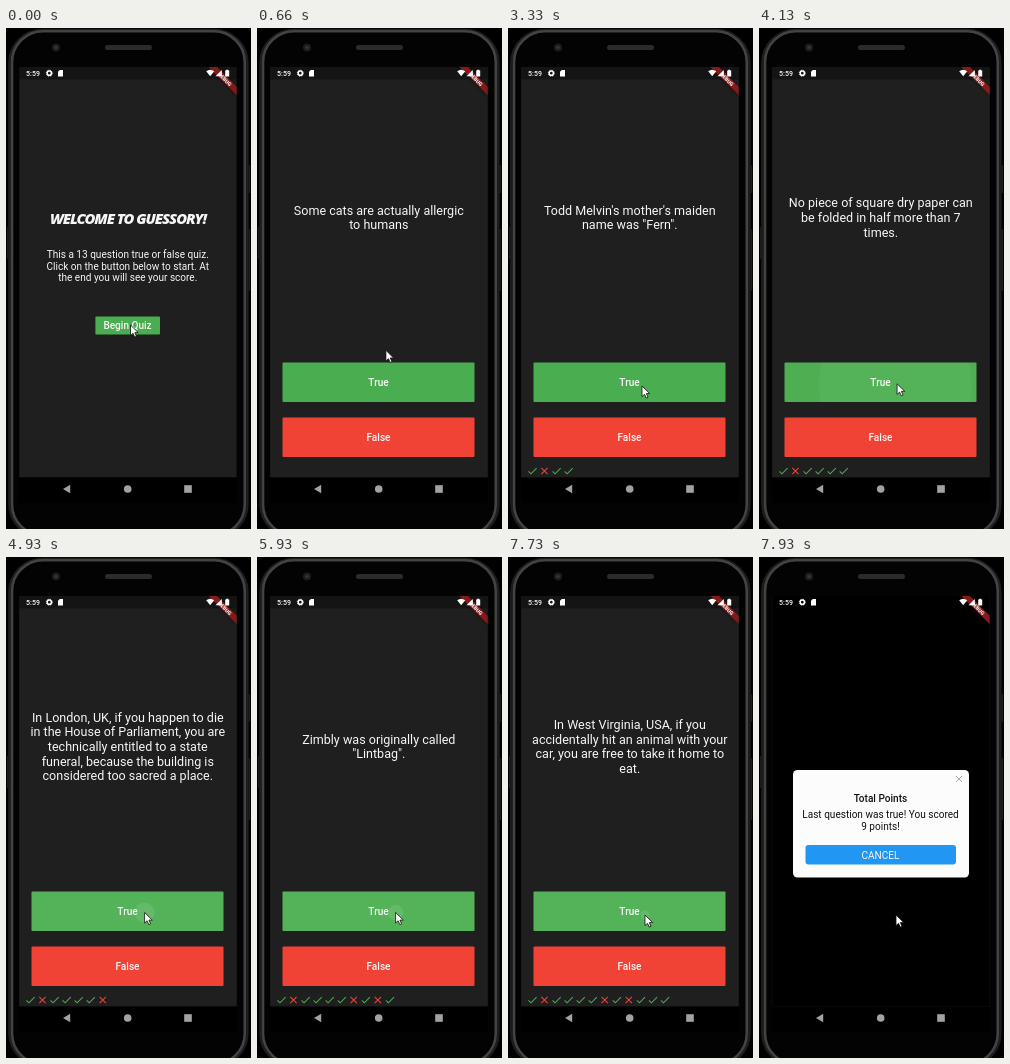
Animation, 245 px wide and 501 px high, one loop 8 s. Source, as an HTML page:

```html
<!DOCTYPE html>
<html lang="en">
<head>
<meta charset="utf-8">
<title>Quiz app</title>
<style>
  html, body { margin: 0; height: 100%; overflow: hidden; background: #000; }
  svg { display: block; width: 245px; height: 501px; }
  text { font: 10.05px Roboto, sans-serif; fill: #f6f6f6; text-anchor: middle; }
  .label { font-weight: 500; }
  .question { font-size: 12.55px; }
  .title { font: italic 800 condensed 18px "Open Sans", "Noto Sans", sans-serif; letter-spacing: -.07em; }
  .dark { fill: #111; }
  .page { fill: #1f1f1f; }
  .green { fill: #4aad4f; }
  .red { fill: #f14335; }
  .marks path { fill: none; stroke-width: 2; }
  .banner { filter: drop-shadow(0 0 1.5px #0009); }
</style>
</head>
<body>
<svg viewBox="0 0 245 501">
  <defs>
    <clipPath id="app"><rect x="13.3" y="39" width="217.3" height="410.2"/></clipPath>
    <clipPath id="beginClip"><rect x="89.4" y="288.5" width="64.6" height="18"/></clipPath>
    <clipPath id="trueClip"><rect x="25.5" y="334.5" width="192" height="39.5"/></clipPath>
  </defs>

  <!-- Phone body -->
  <path d="M1.8 199v32M243.4 137v28M243.4 201v62" stroke="#1e1e1e" stroke-width="1.5"/>
  <rect x="3.4" y="2" width="238" height="507" rx="33" fill="#030303" stroke="#1d1d1d" stroke-width="2.5"/>
  <rect x="6" y="3.2" width="232.8" height="504" rx="31" fill="none" stroke="#434343" stroke-width="2.6"/>
  <circle cx="50" cy="19.5" r="4" fill="#1c1d22"/>
  <circle cx="50" cy="19.5" r="1.8" fill="#34363e"/>
  <rect x="99" y="17" width="47" height="5" rx="2.5" fill="#2b2b2b"/>
  <rect x="13.3" y="39" width="217.3" height="436" fill="#000"/>

  <g clip-path="url(#app)">
    <rect class="page" x="13" y="39" width="218" height="411"/>
    <g id="welcome">
      <text id="title" class="title" x="122" y="195.7">WELCOME TO GUESSORY!</text>
      <text x="121.8" y="230.2">This a 13 question true or false quiz.</text>
      <text x="121.8" y="241.8">Click on the button below to start. At</text>
      <text x="121.8" y="253.4">the end you will see your score.</text>
      <rect class="green" x="89.4" y="288.5" width="64.6" height="18" rx="1"/>
      <g id="beginInk" clip-path="url(#beginClip)" fill="#fff">
        <rect x="89" y="288" width="65" height="19"/><circle/>
      </g>
      <text class="label" x="121.5" y="301">Begin Quiz</text>
    </g>
    <g id="quiz">
      <rect class="page" x="13" y="39" width="218" height="411"/>
      <g id="question"></g>
      <rect class="green" x="25.5" y="334.5" width="192" height="39.5" rx="1"/>
      <g id="trueInk" clip-path="url(#trueClip)" fill="#fff">
        <rect x="25" y="334" width="193" height="41"/><circle/>
      </g>
      <text class="label" x="121.5" y="358">True</text>
      <rect class="red" x="25.5" y="389.5" width="192" height="39.5" rx="1"/>
      <text class="label" x="121.5" y="413">False</text>
      <g id="marks" class="marks"></g>
    </g>
    <rect x="13" y="39" width="218" height="12.5" opacity=".35"/>
    <rect id="barrier" x="13" y="39" width="218" height="411"/>
    <g id="dialog">
      <rect x="34" y="213" width="176" height="107.5" rx="4.5" fill="#fcfcfc"/>
      <path d="M197 219l6 6m0-6l-6 6" stroke="#aaa"/>
      <text class="dark label" x="121.5" y="244.5">Total Points</text>
      <text class="dark" x="121.5" y="261">Last question was true! You scored</text>
      <text class="dark" x="121.5" y="272.5">9 points!</text>
      <rect x="46.5" y="288" width="150.5" height="19.5" rx="3" fill="#2196f3"/>
      <text x="121.5" y="301.5">CANCEL</text>
    </g>
    <path class="banner" d="M202.5 39h8.5L231 59v8.5z" fill="#861a1b"/>
    <text class="label" transform="translate(218.9 51.5) rotate(45)" y="1.8" style="font-size:5.1px;font-weight:800">DEBUG</text>
  </g>

  <!-- Status and navigation bars -->
  <g fill="#fff">
    <text x="27" y="47.8" style="font-size:7px;font-weight:500">5:59</text>
    <circle cx="43.3" cy="45.2" r="2.1" fill="none" stroke="#fff" stroke-width="1.5"/>
    <circle cx="43.3" cy="45.2" r="3" fill="none" stroke="#fff" stroke-width=".9" stroke-dasharray="1.2 1.16"/>
    <path d="M53.8 42h3.2v6.4h-5v-4.6z"/>
    <path d="M200.2 43.3q4-3 8 0l-4 5z"/>
    <path d="M215.8 42v6.3h-6.3z"/>
    <path d="M219.2 42.6h1v-.8h2v.8h1v5.8h-4z"/>
  </g>
  <g fill="#a2a2a2">
    <path d="M57 461l7.2-4.2v8.4z"/>
    <circle cx="121.7" cy="461" r="3.8"/>
    <rect x="178.2" y="457.2" width="7.6" height="7.6"/>
  </g>
  <path id="cursor" d="M0 0v10.6l2.5-2.3 1.7 3.8 1.8-.8-1.7-3.7h3.4z" fill="#fff" stroke="#111" stroke-width=".8"/>
</svg>
<script>
const LOOP = 8000, HOLD = 100, BEGIN = 65;
const questions = [
  "Some cats are actually allergic|to humans",
  "You can lead a cow down stairs|but not up stairs.",
  "Approximately one quarter of|human bones are in the feet.",
  "A slug's blood is green.",
  "Todd Melvin's mother's maiden|name was \"Fern\".",
  "It is illegal to pee in the Ocean in|Portugal.",
  "No piece of square dry paper can|be folded in half more than 7|times.",
  "In London, UK, if you happen to die|in the House of Parliament, you are|technically entitled to a state|funeral, because the building is|considered too sacred a place.",
  "The loudest sound produced by|any animal is 188 decibels. That|animal is the African Elephant.",
  "The total surface area of two|human lungs is approximately 70|square metres.",
  "Zimbly was originally called|\"Lintbag\".",
  "Chocolate affects a dog's heart|and nervous system; a few|ounces are enough to kill a small|dog.",
  "In West Virginia, USA, if you|accidentally hit an animal with your|car, you are free to take it home to|eat."
];
const results = "101111010111";
const presses = [1580, 2080, 2540, 2960, 3420, 3900, 4380, 4840, 5200, 5530, 5860, 7000, 7690];
const finish = presses[12] + HOLD;
// Cursor stops: time, x, y
const stops = [[0, 124.5, 297], [450, 124.5, 297], [950, 136, 363], [2000, 136, 363], [2600, 134, 358],
  [3500, 134, 358], [4300, 138.6, 355.5], [7000, 138.6, 355.5], [7350, 137, 358], [LOOP, 137, 358]];

const el = id => document.getElementById(id);
const progress = (t, from, to) => Math.min(1, Math.max(0, (t - from) / (to - from)));
const smooth = p => p * p * (3 - 2 * p);
const easeOut = p => 1 - (1 - p) ** 3;

function cursorAt(t) {
  const i = stops.findIndex(s => s[0] > t);
  const [t0, x0, y0] = stops[i - 1], [t1, x1, y1] = stops[i];
  const p = smooth(progress(t, t0, t1));
  return [x0 + (x1 - x0) * p, y0 + (y1 - y0) * p];
}

// Splash grows slowly while held, then spreads and fades after release
function drawInk(group, age, [x, y]) {
  const [highlight, splash] = group.children;
  const after = Math.max(0, age - HOLD);
  const fade = age < 0 ? 0 : 1 - progress(after, 0, 200);
  highlight.setAttribute("opacity", .055 * fade * progress(age, 0, 40));
  splash.setAttribute("opacity", .1 * fade);
  splash.setAttribute("r", Math.max(0, Math.min(age, HOLD) * .11 + after * .5));
  splash.setAttribute("cx", x);
  splash.setAttribute("cy", y);
}

let shown = -1;
function showQuestion(n) {
  if (n === shown) return;
  shown = n;
  const lines = questions[n].split("|");
  el("question").innerHTML = lines.map((line, i) =>
    `<text class="question" x="121.8" y="${193.9 + (i - (lines.length - 1) / 2) * 14.6}">${line}</text>`).join("");
  el("marks").innerHTML = [...results.slice(0, n)].map((r, i) =>
    `<path transform="translate(${18.4 + i * 12.05} 437) scale(.502)" ` +
    (r === "1" ? 'd="M4.1 12.7L9 17.6 20.3 6.3" stroke="#4caf50"/>'
               : 'd="M5.7 5.7L18.3 18.3M18.3 5.7L5.7 18.3" stroke="#f44336"/>')).join("");
}

function render(t) {
  el("cursor").setAttribute("transform", `translate(${cursorAt(t)})`);

  drawInk(el("beginInk"), t - BEGIN, cursorAt(BEGIN));
  const enter = progress(t, BEGIN + HOLD, BEGIN + HOLD + 300);
  el("quiz").setAttribute("opacity", enter * enter);
  el("quiz").setAttribute("transform", `translate(0 ${109 * (1 - easeOut(enter))})`);

  const answered = presses.filter(p => t >= p + HOLD).length;
  showQuestion(Math.min(answered, 12));
  const press = presses.filter(p => t >= p).pop() ?? LOOP;
  drawInk(el("trueInk"), t - press, cursorAt(Math.min(press, LOOP - 1)));

  const open = progress(t, finish, finish + 130);
  el("barrier").setAttribute("opacity", open);
  el("dialog").setAttribute("opacity", open > 0 ? 1 : 0);
  el("dialog").setAttribute("transform", `translate(0 ${300 * (1 - easeOut(open))})`);
}

// Keep the heading inside its column whichever font width is available
const title = el("title"), titleWidth = title.getComputedTextLength();
if (titleWidth > 156) title.style.fontSize = 18 * 156 / titleWidth + "px";

const start = performance.now();
function frame() {
  render((performance.now() - start) % LOOP);
  requestAnimationFrame(frame);
}
frame();
</script>
</body>
</html>
```
